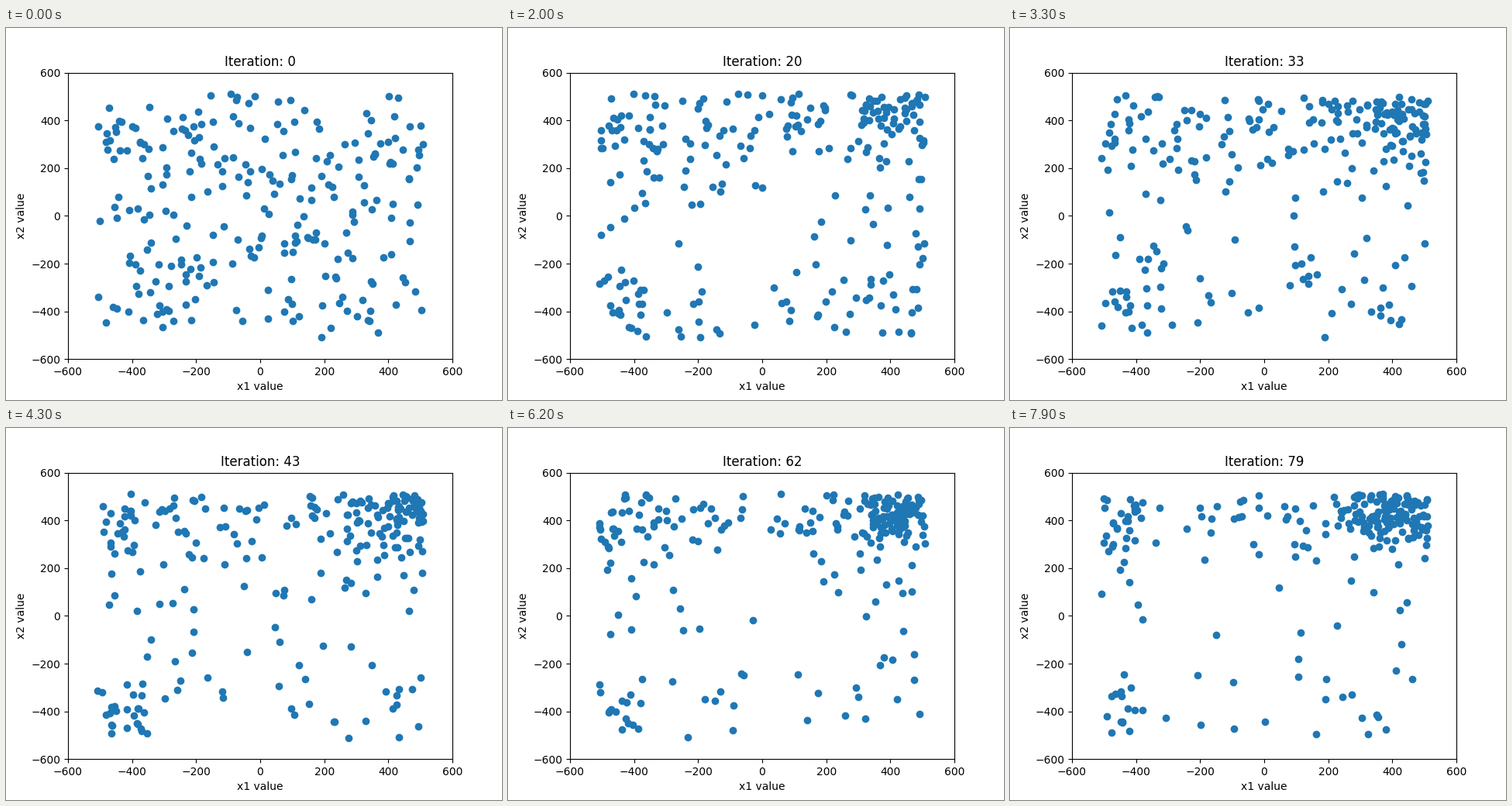
A matplotlib script that plays this animation: 640 px wide and 480 px high, repeating every 8 s.

```python
import numpy as np
import matplotlib.pyplot as plt
from matplotlib.animation import FuncAnimation

POP = 250
STEPS = 80
BOUND = 511


def fold(v):
    """Reflect values that overshoot the search bounds."""
    return np.sign(v) * (BOUND - np.abs(BOUND - np.abs(v)))


def blob(rng, n, centre, spread):
    return rng.normal(centre, spread, (n, 2))


def genes(rng, n, power, positive=0.5):
    """Coordinates that thin out towards zero as power drops below one."""
    size = rng.uniform(0, 1, n)
    size = np.where(rng.random(n) < 0.3, size, size ** power)
    return BOUND * size * np.where(rng.random(n) < positive, 1, -1)


def population(k):
    rng = np.random.default_rng(1000 + k)
    g = (k / (STEPS - 1)) ** 0.8
    settled = 1 - np.exp(-k / 5)

    best = round(POP * 0.48 * g)
    left = round(POP * (0.02 + 0.05 * g))
    low = round(POP * (0.02 + 0.03 * settled))
    top = round(POP * (0.05 + 0.05 * g))
    rest = POP - best - left - low - top

    power = 0.96 - 0.36 * settled
    band = np.column_stack([rng.uniform(-360, 260, top),
                            rng.normal(415, 65, top)])
    scattered = np.column_stack([
        genes(rng, rest, power),
        genes(rng, rest, power, 0.5 + 0.14 * settled),
    ])
    points = np.vstack([
        blob(rng, best, (405, 430), (95 - 17 * g, 75 - 17 * g)),
        blob(rng, left, (-435, 395), (50, 70)),
        blob(rng, low, (-430, -385), (45, 55)),
        band,
        scattered,
    ])
    return np.round(fold(points))


fig, ax = plt.subplots(figsize=(6.4, 4.8), dpi=100)
dots = ax.scatter(*population(0).T, color="#1f77b4")
ax.set(xlim=(-600, 600), ylim=(-600, 600),
       xlabel="x1 value", ylabel="x2 value")
title = ax.set_title("Iteration: 0")


def update(k):
    dots.set_offsets(population(k))
    title.set_text(f"Iteration: {k}")
    return dots, title


anim = FuncAnimation(fig, update, frames=STEPS, interval=100, repeat=True,
                     repeat_delay=0, blit=False)
plt.show()
```
